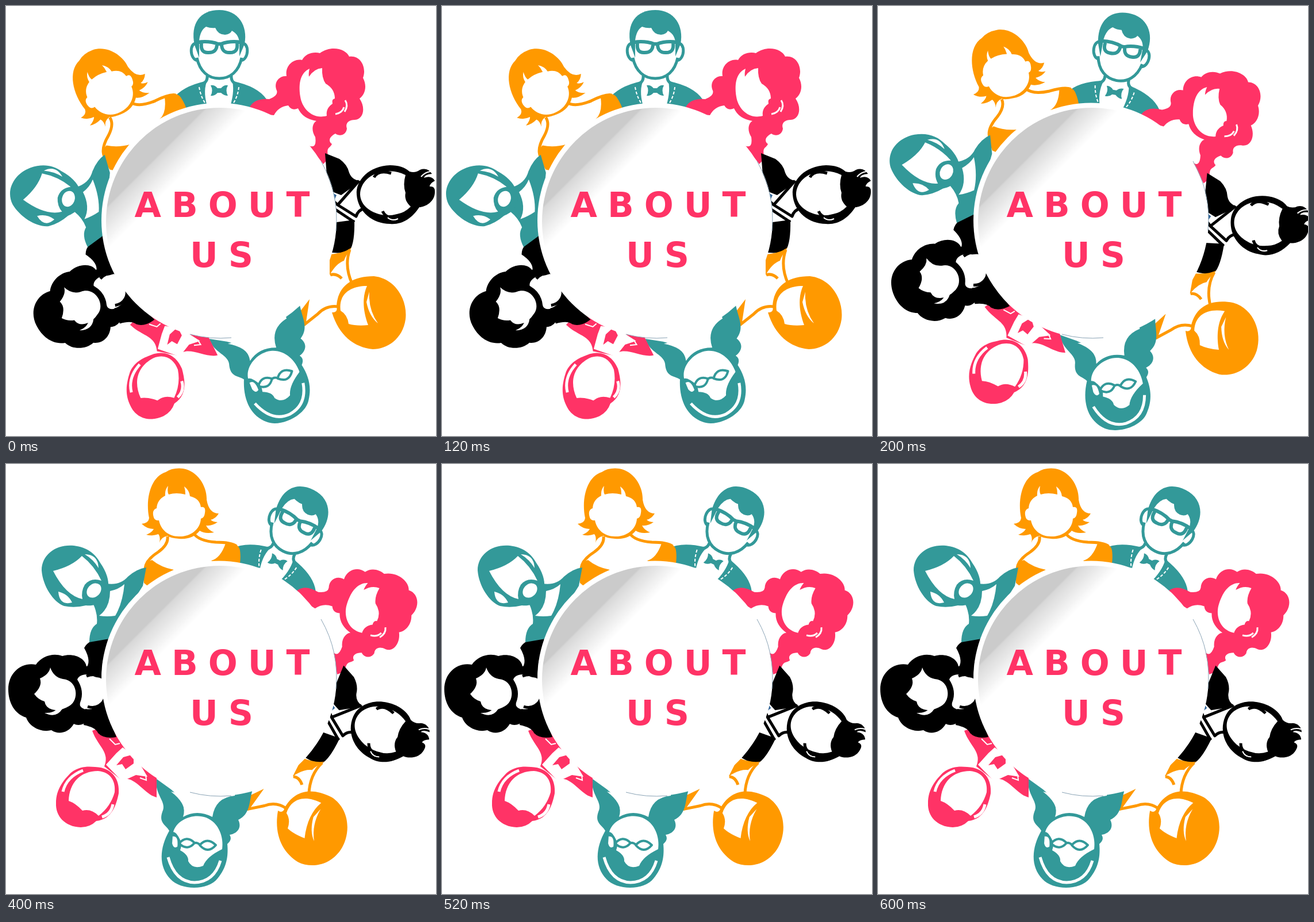
An HTML page that plays this animation: 748 px wide and 748 px high, repeating every 0.8 s.

```html
<!DOCTYPE html>
<html lang="en">
<head>
<meta charset="utf-8">
<title>About us</title>
<style>
html, body { margin: 0; width: 100%; height: 100%; overflow: hidden; background: #fff; }
svg { display: block; width: 100%; height: 100%; }
.teal { --c: #399; }
.orange { --c: #f90; }
.pink { --c: #f36; }
.black { --c: #000; }
g { fill: var(--c); }
.w { fill: #fff; }
.line { fill: none; stroke: var(--c); stroke-width: 5; stroke-linejoin: round; }
.ear { fill: #fff; stroke: var(--c); stroke-width: 5; }
.gap { fill: none; stroke: #fff; stroke-width: 5; }
.rim { fill: none; stroke: #8aa3b5; }
text { font: bold 60px "DejaVu Sans", sans-serif; letter-spacing: 18px; text-anchor: middle; fill: #f36; }
</style>
</head>
<body>
<svg viewBox="0 0 748 748">
  <defs>
    <linearGradient id="shade" gradientUnits="userSpaceOnUse" x1="262" y1="262" x2="300" y2="300">
      <stop stop-color="#cbcbcb"/>
      <stop offset=".06" stop-color="#d8d8d8"/>
      <stop offset="1" stop-color="#fff"/>
    </linearGradient>
  </defs>

  <g class="turn" data-base="0">
    <!-- man with bow tie -->
    <g class="teal">
      <path d="M290 162Q306 140 346 131L371 150L396 131Q438 140 453 162L440 200H300Z"/>
      <path class="w" d="M349 132L371 145L394 132Q398 152 388 180H352Q342 152 349 132Z"/>
      <path class="ear" d="M333 65C318 62 319 94 334 95M409 65C424 62 423 94 408 95"/>
      <path d="M328 68C320 30 338 7 371 7C404 7 421 34 415 66L405 90H336Z"/>
      <path class="w" d="M336 92V60Q338 42 348 36Q356 39 364 38Q369 50 381 50Q390 49 393 43Q406 50 406 66V92C404 112 388 123 371 123C353 123 338 110 336 92Z"/>
      <path class="line" d="M332 90C337 114 352 126 371 126C390 126 405 114 410 90M350 121Q351 132 342 135M392 121Q391 132 400 135"/>
      <path class="line" style="stroke-width:6" d="M333 63Q353 60 369 66H374Q390 60 409 63M340 65Q338 81 351 81Q367 82 367 66M375 66Q375 82 390 81Q404 81 402 65"/>
      <path d="M356 138Q363 137 368 143H374Q379 137 386 138Q381 147 386 156Q379 156 374 151H368Q363 157 356 156Q361 147 356 138Z"/>
      <path class="gap" style="stroke-width:2" stroke-dasharray="5 3" d="M336 141Q339 160 350 174M405 141Q403 160 392 174"/>
    </g>

    <!-- woman with curls -->
    <g class="pink">
      <path d="M424 176Q432 160 458 162Q474 156 471 147C465 134 474 121 488 122C485 104 500 91 515 94C521 82 536 79 546 82C566 67 592 75 597 88C616 85 628 106 621 125C629 140 624 155 615 161C626 177 622 197 607 198C595 198 590 205 593 213C592 224 581 228 573 222C561 228 561 236 567 240C563 249 556 244 561 265L552 275L527 243Q541 249 538 228C529 214 535 202 540 200Q516 196 508 178Q497 183 491 173Q474 175 466 190L420 186Z"/>
      <path class="w" d="M512 158C508 133 513 116 528 109Q526 117 527 123Q536 109 550 108Q549 125 556 135Q572 144 572 161Q566 162 568 170Q556 178 558 191C533 198 515 178 512 158Z"/>
      <path class="gap" style="stroke-width:3" d="M573 188Q585 186 588 176M590 164Q596 173 589 184"/>
    </g>

    <!-- man with quiff -->
    <g class="black">
      <path d="M555 256L580 266Q594 276 597 290Q602 303 616 304L604 314L583 329L560 320ZM560 378L606 372Q607 412 598 425Q590 432 555 428Z"/>
      <path class="line" d="M614 304L577 346L609 366Q612 355 624 352M577 346L555 326M606 376L570 352"/>
      <path fill="#369" d="M566 324L575 329L570 340Z"/>
      <path d="M610 328C608 303 632 278 668 277Q690 277 702 288Q712 291 720 285Q733 280 741 292Q728 293 727 299Q740 294 746 304Q737 309 737 314Q746 313 746 322C747 341 728 350 719 350C706 370 688 381 668 379C638 379 612 358 610 328Z"/>
      <path class="w" d="M616 328C616 307 635 290 657 289Q674 284 695 294Q690 311 695 325Q692 338 704 349Q693 360 680 362Q666 366 653 363C635 359 617 348 616 328Z"/>
      <path class="line" d="M640 298Q648 284 670 291M655 357Q662 372 680 365"/>
      <path class="gap" style="stroke-width:2" d="M722 297Q729 289 738 288M664 368Q672 375 682 370"/>
    </g>

    <!-- woman with a bob -->
    <g class="orange">
      <path d="M563 432Q588 430 601 420Q590 436 588 443Q574 448 563 468ZM528 510L521 556L505 540Z"/>
      <path class="line" d="M598 424Q588 452 602 483M564 468Q574 464 584 474M578 523Q557 520 542 536L518 555"/>
      <path d="M575 522C577 490 598 470 640 470C678 474 699 512 695 545C690 580 662 597 638 597C606 594 579 573 567 533Q578 534 575 522Z"/>
      <path class="w" d="M582 530C578 502 598 487 628 487C620 505 620 528 630 555Q610 557 596 553Q594 537 582 530Z"/>
      <path class="w" d="M632 497Q630 528 647 552Q632 540 627 515Z"/>
    </g>
  </g>

  <g class="turn" data-base="26.8">
    <!-- woman with flicked hair -->
    <g class="orange">
      <path d="M240 207Q236 172 254 167Q270 180 292 184L250 215ZM357 168Q373 164 382 138Q404 136 407 150Q409 165 406 178L380 184Z"/>
      <path class="line" d="M281 126Q283 140 265 153Q243 167 242 182M326 120Q335 134 365 136Q392 136 401 143"/>
      <path d="M236 104Q248 103 249 94C242 60 252 22 278 14Q290 6 308 8C334 12 350 40 349 62Q353 86 370 86Q365 95 356 97Q360 101 368 101Q359 108 348 107Q352 115 362 119Q346 122 337 116Q324 132 301 130Q286 129 281 125Q270 127 267 137Q269 127 265 122Q254 126 244 123Q254 119 257 113Q245 113 236 104Z"/>
      <path class="w" d="M257 93Q253 80 262 77Q263 62 277 55Q276 45 282 38Q280 48 283 53Q296 49 312 53Q312 45 310 39Q319 46 320 56Q337 60 339 75Q348 73 346 85Q345 94 339 95C338 115 319 127 301 126C281 126 269 113 266 98Q259 99 257 93Z"/>
    </g>

    <!-- woman with glasses -->
    <g class="teal">
      <path d="M262 548C257 574 281 588 272 605C265 625 279 628 284 638C267 668 265 700 286 722C304 742 352 742 368 721C384 702 387 682 385 661C392 655 392 650 389 645C402 643 411 633 404 619C425 609 423 588 428 570L430 560H398V577Q364 580 359 614Q332 600 308 614Q316 590 287 566Z"/>
      <path class="w" d="M287 570Q332 582 398 576Q362 582 357 609Q330 601 310 609Q313 590 287 570Z"/>
      <path class="w" d="M291 640C297 618 327 607 348 615C371 624 379 650 376 670Q349 683 343 699Q325 706 317 691Q318 680 303 672Q308 659 299 647Q296 641 291 640Z"/>
      <path class="ear" style="stroke-width:4" d="M288 646Q303 643 300 667Q290 673 287 660Z"/>
      <path class="gap" d="M282 684Q294 727 328 728Q362 727 373 690"/>
      <path class="line" style="stroke-width:4" d="M301 660Q314 645 328 659Q316 674 301 660ZM337 663Q350 648 365 663Q351 679 337 663ZM327 660Q332 657 338 663"/>
    </g>

    <!-- man with tie -->
    <g class="pink">
      <path d="M150 464C160 492 181 500 171 526L200 549C224 540 240 575 262 580V545L190 450Z"/>
      <path class="w" d="M174 523L192 503L203 493L226 510L246 544L226 541L202 552Z"/>
      <path d="M192 524L204 510L222 505L222 521L208 531L202 522Z"/>
      <path class="gap" style="stroke-width:2" d="M180 478L190 488L198 486M233 546L244 550L243 540"/>
      <path d="M87 590C87 565 101 549 113 537C128 525 144 526 155 527C186 528 198 550 196 573C192 592 185 618 157 621Q146 632 130 632C102 631 86 612 87 590Z"/>
      <path class="w" d="M109 586C110 554 130 534 160 534C183 536 191 553 189 571Q182 596 161 612Q148 599 133 603Q121 590 109 586Z"/>
      <path class="gap" d="M99 570Q105 544 134 533M167 614Q183 609 186 592"/>
    </g>

    <!-- woman with wavy hair -->
    <g class="black">
      <path d="M136 320Q145 302 178 304L168 345L166 372Q145 371 138 356Q150 345 136 320ZM138 426Q160 430 169 408L192 475Q171 479 160 468Q156 458 135 454Z"/>
      <path class="line" d="M140 369Q158 362 172 375M142 422Q160 428 172 410"/>
      <path d="M4 392C4 362 28 344 52 349C62 334 82 328 98 334C118 328 138 338 140 352C154 350 164 361 158 371C142 362 127 366 124 375Q137 395 129 415Q126 425 143 428C152 446 131 459 118 452C108 469 90 471 79 463C60 468 40 456 35 441C15 435 4 415 4 392Z"/>
      <path class="w" d="M49 400Q64 386 59 373Q75 366 77 354Q83 371 99 374C125 376 128 411 110 421Q93 431 80 427Q69 424 67 413Q56 410 49 400Z"/>
      <path class="w" d="M67 433Q83 434 89 425L98 426Q87 443 67 433Z"/>
    </g>

    <!-- man with beard -->
    <g class="teal">
      <path d="M174 208Q198 212 212 196Q228 182 244 180L238 212L180 304L145 310Q145 286 158 278Q160 262 152 244Z"/>
      <path class="w" d="M162 264Q181 250 181 221Q196 218 206 209Q203 242 190 264Q176 266 162 264Z"/>
      <path d="M62 185C62 157 88 139 118 142C142 145 156 157 164 172Q180 195 178 216C176 239 158 248 139 246Q119 251 101 247C82 240 64 212 62 185Z"/>
      <path class="w" d="M82 186Q115 178 132 160Q154 177 166 203Q148 197 137 210Q130 222 133 235Q104 229 82 186Z"/>
      <ellipse class="w" cx="153" cy="220" rx="14" ry="11" transform="rotate(-45 153 220)"/>
      <path class="w" d="M91 222Q108 226 115 241Q93 247 91 222ZM137 157Q160 157 161 181Q152 166 137 157Z"/>
    </g>
  </g>

  <circle class="w" cx="370.5" cy="373" r="204.5"/>
  <path class="rim" d="M548 270A204.5 204.5 0 0 1 574 391M320 571A204.5 204.5 0 0 0 392 577"/>
  <circle cx="372" cy="375" r="198" fill="url(#shade)"/>
  <text x="385" y="367">ABOUT</text>
  <text x="384" y="454">US</text>
</svg>
<script>
const angles = [0, 10.3, 26.8, 26.8];
const rings = document.querySelectorAll('.turn');

function draw(now) {
  const angle = angles[Math.floor(now % 800 / 200)];
  for (const ring of rings)
    ring.setAttribute('transform', `rotate(${angle - ring.dataset.base} 373 371)`);
}

const start = performance.now();
function tick() {
  draw(performance.now() - start);
  requestAnimationFrame(tick);
}
tick();
</script>
</body>
</html>
```
